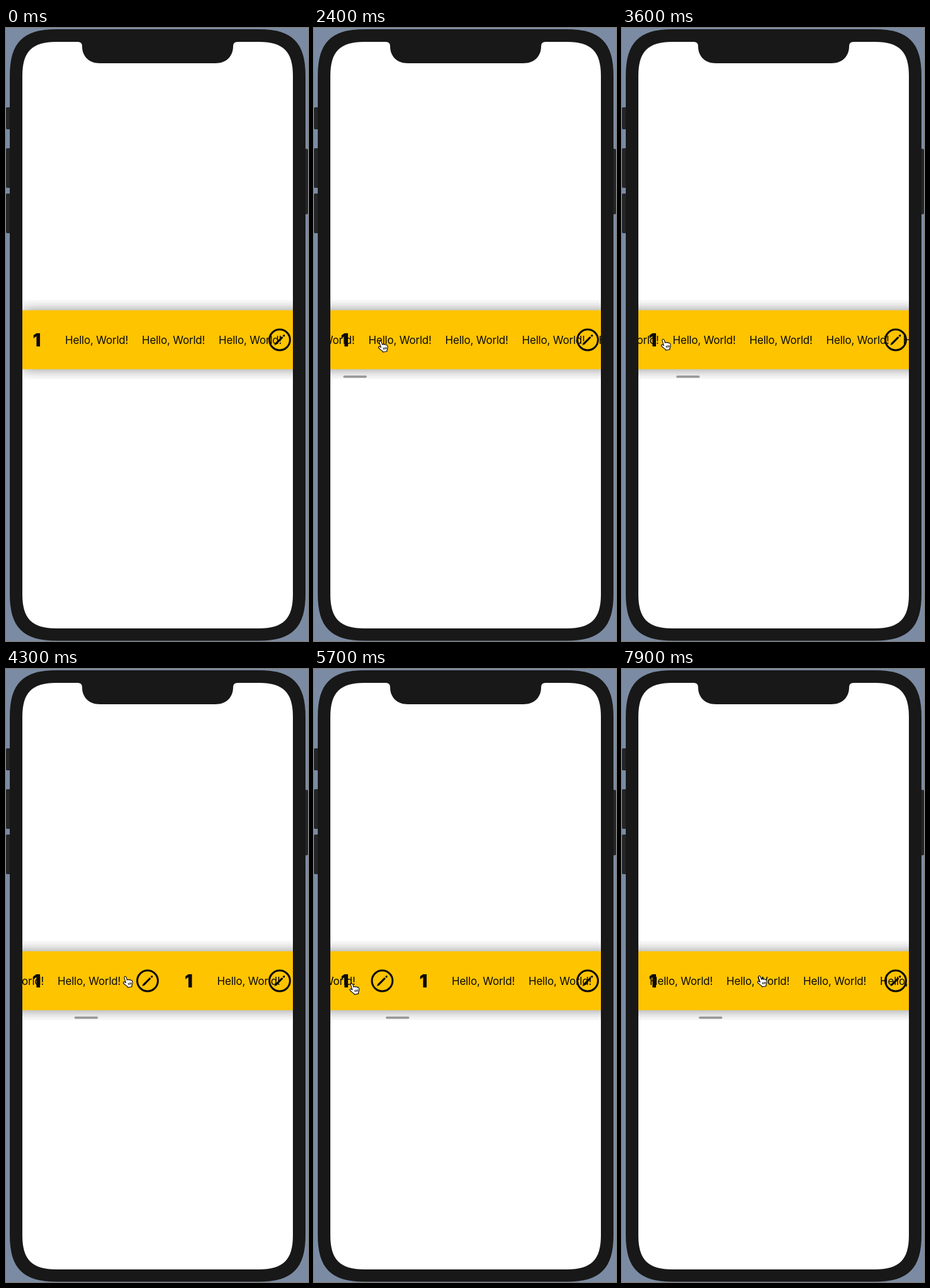
Write an HTML page that moves like this. It is 480 by 974 pixels and loops after 8 s.

```html
<!DOCTYPE html>
<html lang="en">
<head>
<meta charset="utf-8">
<title>Pinned sections</title>
<style>
  html, body { margin: 0; width: 100%; height: 100%; overflow: hidden; background: #7b8ba3; }
  svg { display: block; width: 100%; height: 100%; }
  text { font-family: Inter, Roboto, sans-serif; fill: #0a0a0a; }
  .item { font-size: 17px; letter-spacing: -.2px; }
  .number { font-size: 28.5px; font-weight: 900; text-anchor: middle; }
</style>
</head>
<body>
<svg viewBox="0 0 480 974">
  <defs>
    <clipPath id="viewport"><rect x="26" y="432" width="430" height="126"/></clipPath>
    <filter id="blur" filterUnits="userSpaceOnUse" x="-120" y="390" width="720" height="210">
      <feGaussianBlur stdDeviation="10.5"/>
    </filter>
    <g id="pencil" fill="#0a0a0a">
      <circle r="16.4" fill="none" stroke="#0a0a0a" stroke-width="3"/>
      <path d="M-8.6 8.6L-7.2 4.9L3.4 -5.6L5.6 -3.4L-4.9 7.2Z"/>
      <path d="M4.6 -6.8L6 -8.1Q7 -8.8 7.9 -7.9T8.1 -6L6.8 -4.6Z"/>
    </g>
  </defs>

  <g fill="#242527">
    <rect y="126" width="12" height="35" rx="2"/>
    <rect y="191" width="12" height="63" rx="2"/>
    <rect y="263" width="12" height="63" rx="2"/>
    <rect x="470" y="192" width="10" height="104" rx="2"/>
  </g>
  <path id="body" fill="#181818"/>
  <path id="screen" fill="#fff"/>
  <path fill="#181818" d="M114 21V22Q121 22 121 29C121 45 132 56 149 56H333C350 56 361 45 361 29Q361 22 368 22V21Z"/>

  <g clip-path="url(#viewport)">
    <rect id="shadow" y="448.5" width="640" height="93.7" opacity=".45" filter="url(#blur)"/>
    <rect id="band" y="448.5" width="640" height="93.7" fill="#ffc400"/>
    <g id="sections"></g>
    <rect id="bar" y="552.2" width="37.5" height="3.6" rx="1.8" fill="#969696"/>
  </g>

  <path id="hand" fill="#fff" stroke="#000" stroke-width="1.1" stroke-linejoin="round"
    d="M-3.6 1.6L-6 -6.2C-6.6 -8.6 -3.7 -9.4 -2.9 -7.1L-1.4 -2.6C-1.2 -4 1 -4.2 1.5 -2.6C2 -3.9 3.9 -3.7 4.3 -2.1C5 -3 6.6 -2.4 6.9 -.7C7.5 2.6 7.2 4 5.9 6.1L6.2 7.7L-.4 9L-1 7.5C-3.2 6.4 -5 4.2 -6.9 2.8C-8.6 1.2 -6.6 -.6 -5 .6ZM.3 1.8L1 5M2.5 1.4L3.1 4.6M4.6 1L5.1 4.1"/>
</svg>
<script>
  const LOOP = 8000, STEP = 100, GLIDE = 400;
  const STRIDE = 1961.5, ITEMS = 15, PITCH = 122;
  const HEADER_X = 49, FOOTER_X = 435, FOOTER_END = 1945, PIN_GAP = 44;
  const MIDDLE = 495.5, BAR_RATE = .0462;

  const linear = u => u;
  const smooth = u => u * u * (3 - 2 * u);
  const mix = (a, b, u) => a + (b - a) * u;
  const progress = (t, start, duration) => Math.min(Math.max((t - start) / duration, 0), 1);

  // The hand travels from press to lift; a flick keeps scrolling after the lift.
  const flick = (start, settle, distance, press, lift) =>
    ({ start, settle, distance, press, lift, held: GLIDE, ease: smooth });
  const drag = (start, settle, distance, press, lift) =>
    ({ start, settle, distance, press, lift, held: settle, ease: linear });
  const gestures = [
    flick(1900, 1000, 747, [366, 503], [110, 506]),
    flick(2900, 1400, 973, [341, 503], [70, 503]),
    drag(4300, 2000, 166.5, [194, 497], [9, 513]),
    drag(7100, 800, 125, [345, 500], [223, 496])
  ];
  const handHome = [494, 690];

  const $ = id => document.getElementById(id);

  function add(parent, tag, attrs, label = "") {
    const node = document.createElementNS("http://www.w3.org/2000/svg", tag);
    for (const name in attrs) node.setAttribute(name, attrs[name]);
    node.textContent = label;
    return parent.appendChild(node);
  }

  const move = (node, x, y = 0) => node.setAttribute("transform", `translate(${x} ${y})`);

  // Rounded box with continuous corners that reach `e` along each side
  function smoothBox(l, t, r, b, e) {
    const c = e * .285;
    return `M${l} ${t + e}C${l} ${t + c} ${l + c} ${t} ${l + e} ${t}` +
      `H${r - e}C${r - c} ${t} ${r} ${t + c} ${r} ${t + e}` +
      `V${b - e}C${r} ${b - c} ${r - c} ${b} ${r - e} ${b}` +
      `H${l + e}C${l + c} ${b} ${l} ${b - c} ${l} ${b - e}Z`;
  }

  function scrollAt(t) {
    return gestures.reduce((sum, g) => sum + g.distance * g.ease(progress(t, g.start, g.settle)), 0);
  }

  // Glide to each press point, then follow the stroke
  function handAt(t) {
    let point = handHome;
    for (const g of gestures) {
      const approach = smooth(progress(t, g.start - GLIDE, GLIDE));
      const stroke = g.ease(progress(t, g.start, g.held));
      point = point.map((from, axis) =>
        mix(mix(from, g.press[axis], approach), g.lift[axis], stroke));
    }
    return point;
  }

  $("body").setAttribute("d", smoothBox(6, 2, 476, 973.5, 74));
  $("screen").setAttribute("d", smoothBox(26, 22, 456, 954, 54));

  const sections = [0, 1].map(index => {
    const row = add($("sections"), "g", {});
    for (let i = 0; i < ITEMS; i++)
      add(row, "text", { class: "item", x: 94 + i * PITCH, y: 501.7 }, "Hello, World!");
    const header = add($("sections"), "text", { class: "number", y: 505.8 }, "1");
    const footer = add($("sections"), "use", { href: "#pencil" });
    return { start: index * STRIDE, row, header, footer };
  });

  function draw(t) {
    const scroll = scrollAt(t);
    for (const { start, row, header, footer } of sections) {
      const x = start - scroll;
      move(row, x);
      move(header, Math.min(Math.max(HEADER_X, x + HEADER_X), x + FOOTER_END - PIN_GAP));
      move(footer, Math.max(Math.min(FOOTER_X, x + FOOTER_END), x + HEADER_X + PIN_GAP), MIDDLE);
    }
    const left = Math.max(-90, 26 - scroll);
    $("shadow").setAttribute("x", left);
    $("band").setAttribute("x", left);
    $("bar").setAttribute("x", 29.2 + scroll * BAR_RATE);
    $("bar").style.visibility = t >= gestures[0].start ? "visible" : "hidden";
    move($("hand"), ...handAt(t));
  }

  const begin = performance.now();
  function tick() {
    const t = (performance.now() - begin) % LOOP;
    draw(Math.floor(t / STEP) * STEP);
    requestAnimationFrame(tick);
  }
  tick();
</script>
</body>
</html>
```
